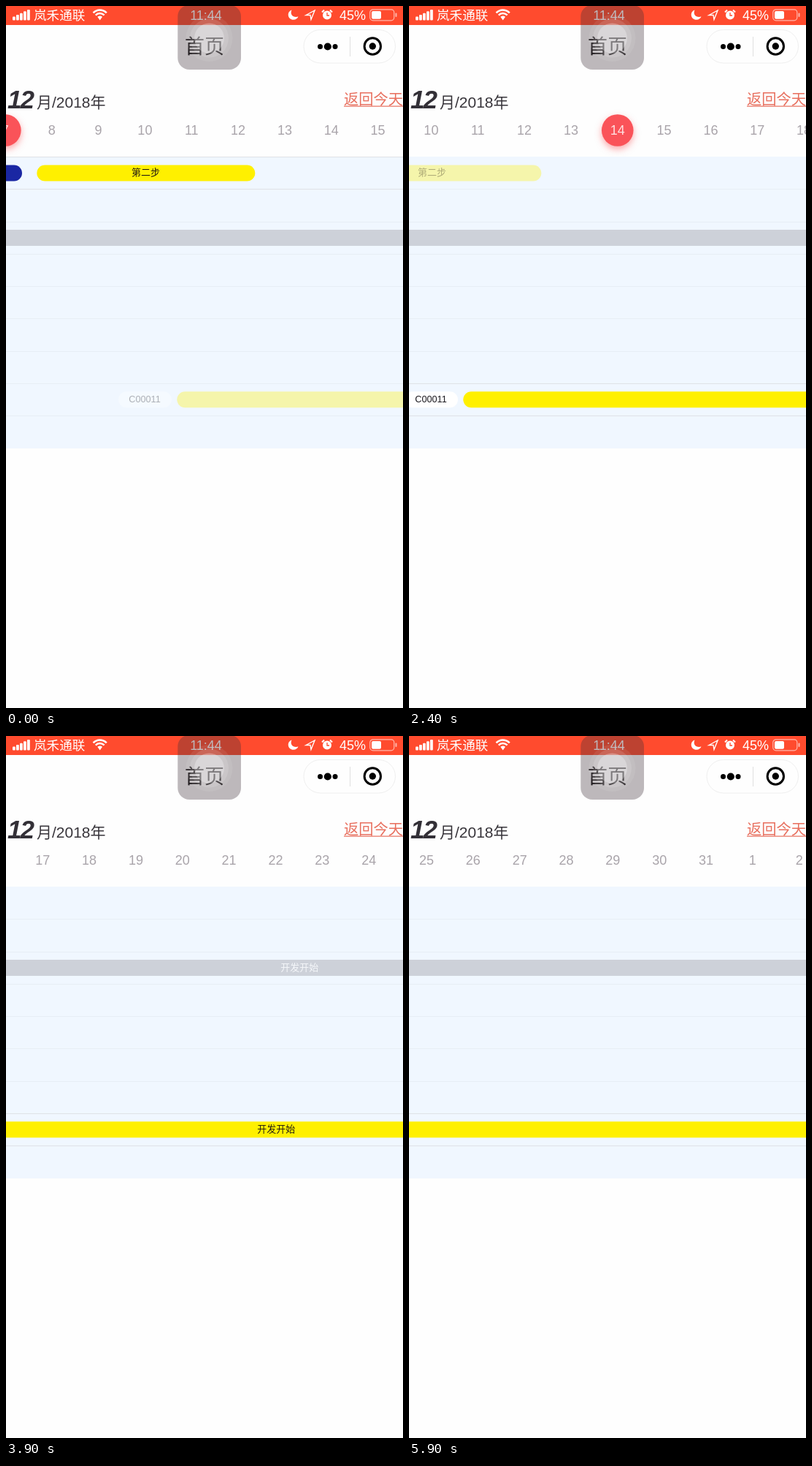
An HTML page with a canvas that plays this animation: 544 px wide and 960 px high, repeating every 6 s.

```html
<!DOCTYPE html>
<html lang="zh-CN">
<head>
<meta charset="utf-8">
<title>日程</title>
<style>
html, body { margin: 0; width: 100%; height: 100%; overflow: hidden; background: #fff; }
canvas { display: block; width: 544px; height: 960px; }
</style>
</head>
<body>
<canvas id="stage" width="544" height="960"></canvas>
<script>
const ctx = document.getElementById('stage').getContext('2d');
const W = 544, H = 960, LOOP = 6000, TICK = 100;
const DAY = 63.84, DAY_X = 62.7;        // column width, centre of day 8
const TOP = 206, ROW = 44.25, ROWS = 9;
const YELLOW = '#fff000', FADED = 0.33;
const FONT = '"Liberation Sans", "Noto Sans CJK SC", "Noto Sans CJK", sans-serif';

// [time, scroll offset]; the picture advances in ticks
const SCROLL = [
  [0, 0], [100, 32], [200, 44], [600, 44],
  [700, 64], [800, 86], [900, 100], [1000, 108], [1600, 108],
  [1700, 181], [1800, 190], [1900, 194], [2300, 194],
  [2400, 160], [2700, 160], [2800, 125], [2900, 118], [3200, 118],
  [3300, 90], [3900, 587], [4000, 625], [4100, 642], [4300, 642],
  [4400, 682], [4500, 695], [4700, 695],
  [4800, 732], [4900, 755], [5000, 768], [5200, 768],
  [5300, 850], [5400, 885], [5700, 885], [5800, 1050], [5900, 1124]
];

function scrollAt(t) {
  const i = SCROLL.findIndex(k => k[0] >= t);
  if (i <= 0) return SCROLL[0][1];
  const [t0, s0] = SCROLL[i - 1], [t1, s1] = SCROLL[i];
  return s0 + (s1 - s0) * (t - t0) / (t1 - t0);
}

function rect(x, y, w, h, color) {
  ctx.fillStyle = color;
  ctx.fillRect(x, y, w, h);
}

function pill(x, y, w, h, r, color) {
  ctx.beginPath();
  ctx.roundRect(x, y, w, h, r);
  ctx.fillStyle = color;
  ctx.fill();
}

function disc(x, y, r, color) {
  ctx.beginPath();
  ctx.arc(x, y, r, 0, 7);
  ctx.fillStyle = color;
  ctx.fill();
}

function stroke(color, width) {
  ctx.strokeStyle = color;
  ctx.lineWidth = width;
  ctx.stroke();
}

function text(str, x, y, size, color, align = 'left', style = '') {
  ctx.font = `${style} ${size}px ${FONT}`;
  ctx.textAlign = align;
  ctx.fillStyle = color;
  ctx.fillText(str, x, y);
}

function statusBar() {
  rect(0, 0, W, 26, '#ff4b2e');
  for (let i = 0; i < 5; i++) {
    const h = 5 + i * 2.4;
    pill(9 + i * 5, 19.5 - h, 3.8, h, 1, '#fff');
  }
  text('岚禾通联', 38, 18.5, 17.6, '#fff');

  for (const r of [12.5, 8]) {
    ctx.beginPath();
    ctx.arc(128.7, 18, r, -Math.PI * 0.76, -Math.PI * 0.24);
    stroke('#fff', 2.6);
  }
  ctx.beginPath();
  ctx.moveTo(128.7, 19.5);
  ctx.arc(128.7, 18, 4.6, -Math.PI * 0.76, -Math.PI * 0.24);
  ctx.fillStyle = '#fff';
  ctx.fill();

  text('11:44', 274, 18.5, 18, '#fff', 'center');

  ctx.beginPath();
  ctx.moveTo(391.5, 5.5);
  ctx.bezierCurveTo(384, 8, 386, 19, 394, 18.8);
  ctx.bezierCurveTo(397, 18.8, 399.5, 17, 400.5, 14.5);
  ctx.bezierCurveTo(394, 16.5, 388.5, 12, 391.5, 5.5);
  ctx.fill();

  ctx.beginPath();
  ctx.moveTo(411, 12.5);
  ctx.lineTo(423, 6);
  ctx.lineTo(418, 18.5);
  ctx.lineTo(417, 12.5);
  ctx.closePath();
  stroke('#fff', 1.4);

  disc(440, 12.5, 6, '#fff');
  ctx.beginPath();
  ctx.moveTo(440, 9);
  ctx.lineTo(440, 13);
  ctx.lineTo(443, 13);
  stroke('#ff4b2e', 1.3);
  ctx.beginPath();
  ctx.moveTo(433, 8.5);
  ctx.lineTo(436, 5.5);
  ctx.moveTo(447, 8.5);
  ctx.lineTo(444, 5.5);
  stroke('#fff', 2);

  text('45%', 457, 18.5, 18, '#fff');
  ctx.beginPath();
  ctx.roundRect(498.8, 4.8, 33, 15, 4);
  stroke('rgba(255,255,255,.6)', 1.2);
  pill(501, 7, 13, 10.8, 2, '#fff');
  pill(533.5, 9.5, 2, 5.5, 1, 'rgba(255,255,255,.6)');
}

function header() {
  text('首页', 245, 65, 27, '#111', 'left', '500');

  ctx.beginPath();
  ctx.roundRect(408, 32.5, 125.5, 45.5, 22.7);
  stroke('#efefef', 1);
  for (const [x, r] of [[430.5, 3.5], [440.8, 5.1], [451, 3.5]]) disc(x, 55.5, r, '#000');
  rect(471, 42, 1, 27, '#e0e0e0');
  ctx.beginPath();
  ctx.arc(502.3, 55, 11.2, 0, 7);
  stroke('#000', 3);
  disc(502.3, 55, 4.7, '#000');

  ctx.letterSpacing = '-2px';
  text('12', 2, 139.5, 35, '#333037', 'left', 'italic bold');
  ctx.letterSpacing = '0px';
  text('月/2018年', 42, 139, 21, '#38353b');
  text('返回今天', 463, 135, 20.3, '#e8705f');
  rect(463, 136.5, 81, 1.2, '#e8705f');
}

function days(scroll, picked) {
  const first = 7 + Math.floor(scroll / DAY);
  for (let d = first; d < first + 11; d++) {
    const x = DAY_X + (d - 8) * DAY - scroll;
    const on = d === picked;
    if (on) {
      ctx.save();
      ctx.shadowColor = 'rgba(250,84,88,.5)';
      ctx.shadowBlur = 10;
      ctx.shadowOffsetY = 4;
      disc(x, 170, 21.8, '#fa5359');
      ctx.restore();
    }
    text((d - 1) % 31 + 1, x, 176, 18, on ? '#ffe0e0' : '#a9a4aa', 'center');
  }
}

function rowLines(active) {
  rect(0, TOP, W, 399, '#f0f7ff');
  for (let i = 0; i < ROWS; i++) {
    const strong = i === active || i === active + 1;
    if (i || strong) rect(0, Math.round(TOP + i * ROW), W, 1, strong ? '#dfe2e6' : '#e7eef5');
  }
}

function chart(scroll, active) {
  rowLines(active);
  const x = w => w - scroll;
  const fade = row => { ctx.globalAlpha = row === active ? 1 : FADED; };

  fade(0);
  pill(x(-120), 217.5, 142, 22, 11, '#1a27a3');
  pill(x(42.3), 217.5, 299, 22, 11, YELLOW);
  text('第二步', x(191.5), 232.3, 13, '#241c12', 'center');

  ctx.globalAlpha = 1;
  rect(0, 306, W, 22, '#cdd1d9');
  text('开发开始', x(989.3), 320.7, 13, '#f5f7fa', 'center');

  fade(7);
  pill(x(154), 527.3, 73, 22, 11, '#fff');
  text('C00011', x(190), 542.2, 12.7, '#1c1a20', 'center');
  pill(x(234.3), 527.3, 2400, 22, 11, YELLOW);
  text('开发开始', x(957.3), 542.2, 13, '#241c12', 'center');
  ctx.globalAlpha = 1;
}

function touchButton() {
  pill(235.3, -1, 86.7, 88, [15, 15, 16, 16], 'rgba(62,48,56,.34)');
  disc(278.5, 44, 32, 'rgba(255,255,255,.08)');
  disc(278.5, 44, 26.5, 'rgba(255,255,255,.12)');
  disc(278.5, 44, 20.5, 'rgba(255,255,255,.28)');
}

function draw(t) {
  rect(0, 0, W, H, '#fefefe');
  const scroll = scrollAt(t);
  statusBar();
  header();
  days(scroll, t < 700 ? 7 : 14);
  chart(scroll, t < 2400 ? 0 : 7);
  touchButton();
}

const start = performance.now();
function frame() {
  const t = (performance.now() - start) % LOOP;
  draw(Math.floor(t / TICK) * TICK);
  requestAnimationFrame(frame);
}
frame();
</script>
</body>
</html>
```
